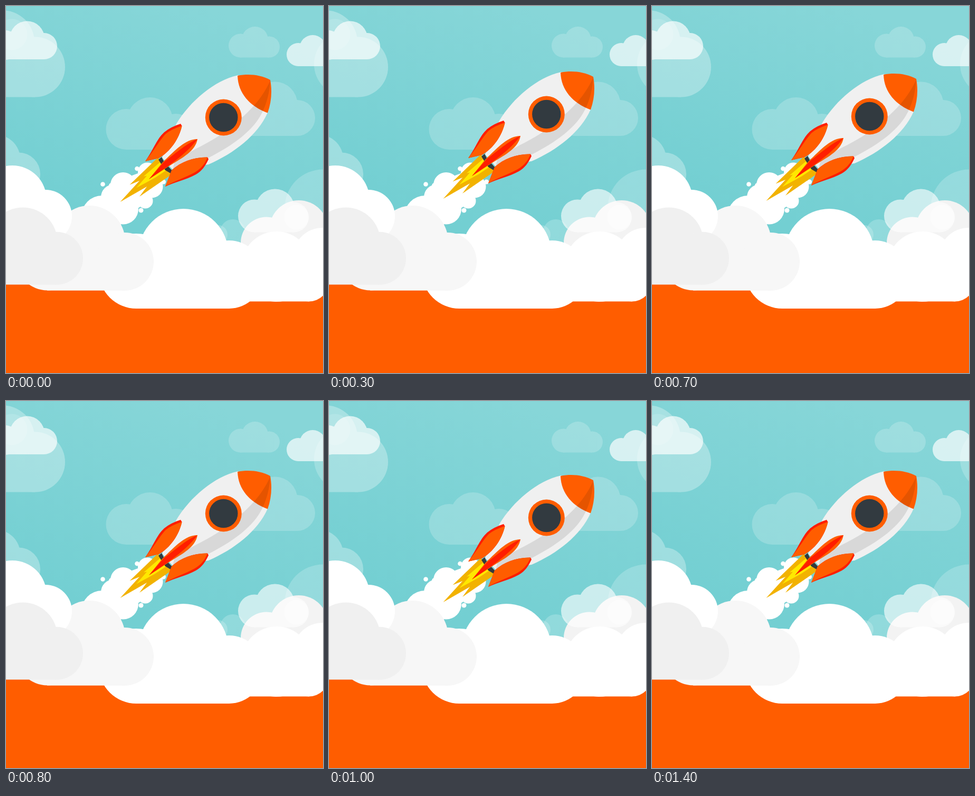
An HTML page without scripts for the animation above (1.5 s loop, 601x695 px).

```html
<!DOCTYPE html>
<html lang="en">
<head>
<meta charset="utf-8">
<title>Rocket above the clouds</title>
<style>
  html, body { margin: 0; width: 100%; height: 100%; overflow: hidden; }
  svg { display: block; width: 601px; height: 695px; }
  .white { fill: #fff; }
  .faint { fill: #fff; opacity: .2; }
  .hazy { fill: #fff; opacity: .3; }
  .bright { fill: #fff; opacity: .68; }
  .orange { fill: #ff5d00; }
  .red { fill: #ff1e00; }
  .dark { fill: #323a40; }
  .rocket { animation: hover 1500ms steps(5, end) infinite; }
  @keyframes hover {
    0%, 100% { transform: translateY(0); }
    33.3333% { transform: translateY(-10px); }
    66.6667% { transform: translateY(10px); }
  }
</style>
</head>
<body>
<svg viewBox="0 0 601 695">
  <defs>
    <linearGradient id="sky" gradientUnits="userSpaceOnUse" x1="370" y1="0" x2="240" y2="410">
      <stop offset="0" stop-color="#87d6d8"/>
      <stop offset="1" stop-color="#73cfd2"/>
    </linearGradient>
  </defs>
  <rect width="601" height="695" fill="url(#sky)"/>

  <!-- distant clouds -->
  <g class="hazy">
    <circle cx="-7" cy="69" r="61"/>
    <circle cx="55" cy="115.500" r="57"/>
    <rect y="90" width="55" height="82.500"/>
  </g>
  <g class="bright">
    <circle cx="-2" cy="74" r="28"/>
    <circle cx="40" cy="61.500" r="33"/>
    <circle cx="72" cy="76" r="25"/>
    <rect y="72" width="72" height="29"/>
  </g>
  <circle cx="11" cy="54" r="29.500" fill="#fff" opacity=".13"/>
  <g class="faint">
    <circle cx="228" cy="233.500" r="38.500"/>
    <circle cx="273" cy="216" r="43"/>
    <circle cx="322" cy="238" r="34"/>
    <rect x="228" y="230" width="94" height="42"/>
  </g>
  <g class="faint">
    <circle cx="444.500" cy="75" r="22.500"/>
    <circle cx="472" cy="64" r="25"/>
    <circle cx="499" cy="77.500" r="20"/>
    <rect x="444" y="70" width="55" height="27.500"/>
  </g>
  <circle class="faint" cx="645" cy="110" r="61"/>
  <g class="bright">
    <circle cx="554" cy="92" r="22"/>
    <circle cx="581.500" cy="80" r="25"/>
    <rect x="554" y="80" width="47" height="34"/>
  </g>
  <g class="faint">
    <circle cx="466" cy="207" r="39"/>
    <circle cx="510" cy="186" r="42.500"/>
    <circle cx="552" cy="212" r="34"/>
    <rect x="466" y="205" width="86" height="41"/>
  </g>
  <g class="hazy">
    <circle cx="-19" cy="290" r="46"/>
    <circle cx="24" cy="318.500" r="41"/>
  </g>
  <circle class="faint" cx="601" cy="382" r="72.500"/>
  <circle class="faint" cx="430" cy="428" r="24"/>
  <circle class="faint" cx="402" cy="433" r="18"/>

  <!-- right-hand pair -->
  <g fill="#f3f3f3">
    <circle cx="494" cy="448.500" r="49"/>
    <circle cx="555" cy="424" r="56"/>
    <rect x="494" y="430" width="107" height="70"/>
  </g>
  <g class="bright" style="opacity: .62">
    <circle cx="471" cy="397.500" r="31"/>
    <circle cx="510" cy="383.500" r="37"/>
    <circle cx="545.500" cy="400" r="28.500"/>
    <rect x="471" y="395" width="75" height="33.500"/>
  </g>
  <circle cx="550.500" cy="400" r="23.500" fill="#fff" opacity=".3"/>

  <rect class="orange" y="480" width="601" height="215"/>

  <!-- exhaust smoke -->
  <g class="white">
    <circle cx="182" cy="398" r="39"/>
    <circle cx="204" cy="362" r="24"/>
    <circle cx="222" cy="339" r="24"/>
    <circle cx="222" cy="384.500" r="29"/>
    <circle cx="268" cy="314.500" r="18"/>
    <circle cx="276" cy="342" r="21.500"/>
    <circle cx="264" cy="369" r="14.500"/>
    <path d="M190 380L215 330L255 315L270 304L297 318L280 355L262 375L240 390Z"/>
    <circle cx="183.500" cy="337.500" r="4.300"/>
    <circle cx="200" cy="340" r="5"/>
    <circle cx="248.500" cy="308" r="4.300"/>
    <circle cx="256" cy="387" r="4.500"/>
    <circle cx="298.500" cy="333" r="4.500"/>
  </g>

  <!-- front clouds -->
  <g class="white">
    <circle cx="247" cy="502" r="71"/>
    <circle cx="336.500" cy="469" r="85"/>
    <circle cx="423" cy="508.500" r="64.500"/>
    <rect x="247" y="500" width="176" height="73"/>
    <circle cx="513" cy="493.500" r="66.500"/>
    <circle cx="600" cy="476" r="56"/>
    <circle cx="575" cy="523.500" r="36"/>
    <rect x="423" y="500" width="152" height="59.500"/>
    <rect x="550" y="476" width="51" height="52"/>
  </g>
  <g fill="#f7f7f7">
    <circle cx="78" cy="480" r="58.500"/>
    <circle cx="158" cy="446" r="68"/>
    <circle cx="225" cy="484" r="55"/>
    <rect x="78" y="470" width="147" height="68.800"/>
  </g>
  <g class="white">
    <circle cx="12" cy="367" r="65"/>
    <circle cx="75" cy="398" r="50"/>
    <rect y="390" width="75" height="58"/>
  </g>
  <g fill="#f0f0f0">
    <circle cx="32" cy="447" r="65.500"/>
    <circle cx="96" cy="477.800" r="50"/>
    <rect y="440" width="96" height="87.600"/>
  </g>

  <g class="rocket">
    <path fill="#f2b200" d="M288 287L234.500 338.500L253 331L216.500 371L267 342L253 361L314 319Z"/>
    <path fill="#ffe800" d="M293 295L261 322.500L267 321.500L247 344.500L283 325L304 311Z"/>
    <path class="dark" d="M289 291L295 286L300 296L316 313L314 318L302 311L294 299Z"/>

    <path fill="#f0f0f0" d="M440 131C395 141 349 180 323 223L296 287L316 310L384 300C432 279 477 245 496 202Z"/>
    <path class="orange" d="M439 132C460 128 482 130 501 140C505 162 503 183 496 202.500C462 190 440 165 439 132Z"/>
    <path opacity=".1" d="M501 141C482 184 450 211 412 240C388 258 350 274 320 293L316 310L383 288C430 264 470 236 487 199C498 175 500 155 501 141Z"/>

    <circle class="orange" cx="412.300" cy="211" r="34.500"/>
    <circle class="dark" cx="412.300" cy="211" r="27.200"/>

    <path class="red" d="M264 294C282 268 285 253 300 239Q312 229 331 223L333.500 227C328 252 312 275 290 288Z"/>
    <path class="orange" d="M264 294C287 265 292 253 303 242Q314 233 333.500 227C328 252 312 275 290 288Z"/>
    <path class="red" d="M302 342L314 311C332 295 355 286 382 286.500L384 290C378 303 371 313 360 319C340 330 320 333 302 342Z"/>
    <path class="orange" d="M302 341.500L314 311C332 295 355 286 382 286.500C377 299 370 308 358 315C340 325 322 330 302 341.500Z"/>
    <path class="orange" d="M363 252C340 252 322 272 296 297L271 328L311 302C335 287 359 275 363 252Z"/>
    <path class="red" d="M363 252C345 259 325 276 299 296L271 328L309 302C335 283 352 267 363 252Z"/>
  </g>
</svg>
</body>
</html>
```
